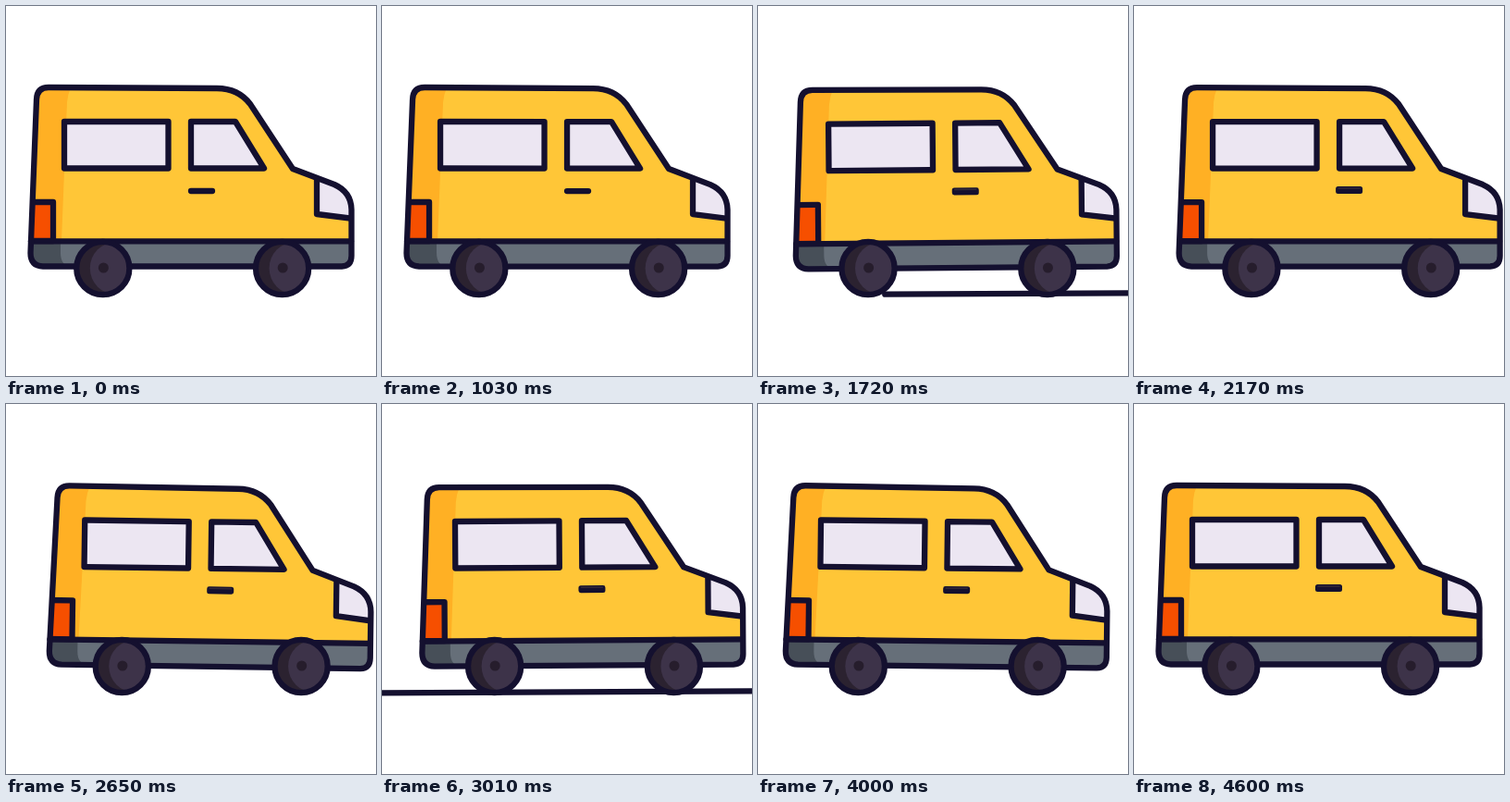
Recreate the animation shown at these times as an HTML page with a canvas. Size 400x400 px, loop 4630 ms.

```html
<!DOCTYPE html>
<html lang="en">
<head>
<meta charset="utf-8">
<title>Van</title>
<style>
  html, body { margin: 0; width: 100%; height: 100%; overflow: hidden; background: #fff; }
  canvas { display: block; width: 400px; height: 400px; }
</style>
</head>
<body>
<canvas id="stage" width="400" height="400"></canvas>
<script>
const ctx = document.getElementById('stage').getContext('2d');

const LOOP = 4630;
const START = 1000;
const PEAK = 2220;
const REACH = 22.2;
const INK = '#14102f';
const GLASS = '#ece6f2';

const BODY = new Path2D(
  'M33 101 Q33.5 88 46 88 L228 89 Q251 89 264 106 L310 176 L355 193 ' +
  'Q373 201 373.5 220 V270 Q373.5 281 363 281.5 H40 Q26.5 281 26.5 267 Z');
const SIDE_WINDOW = new Path2D('M63 125 H175.5 V175.5 H63 Z');
const DOOR_WINDOW = new Path2D('M200 125 H248 L279 175.5 H200 Z');
const TAIL_LIGHT = new Path2D('M20 212 H51 V254 H20 Z');
const HEADLIGHT = new Path2D('M336 180 V225 L380 230.5 V180 Z');
const HANDLE = new Path2D('M200 200 H223');
const SILL = new Path2D('M27 254.3 H373');

// Tilt of the body in degrees; positive is nose down.
const TILT = [[1000, 0], [1300, 0.5], [1850, -0.65], [2560, 0.85],
              [3170, -0.6], [3880, 0.72], [4600, 0]];

const clamp = p => Math.min(1, Math.max(0, p));
const ease = p => (1 - Math.cos(Math.PI * clamp(p))) / 2;

function shift(t) {
  return REACH * (t < PEAK
    ? ease((t - START) / (PEAK - START))
    : 1 - ease((t - PEAK) / (LOOP - PEAK)));
}

function tilt(t) {
  for (let i = 1; i < TILT.length; i++) {
    const [t0, a] = TILT[i - 1], [t1, b] = TILT[i];
    if (t < t1) return a + (b - a) * ease((t - t0) / (t1 - t0));
  }
  return 0;
}

function fill(path, color) {
  ctx.fillStyle = color;
  ctx.fill(path);
}

function stroke(path, width = 6.3, color = INK) {
  ctx.strokeStyle = color;
  ctx.lineWidth = width;
  ctx.stroke(path);
}

function circle(x, y, r) {
  const path = new Path2D();
  path.arc(x, y, r, 0, Math.PI * 2);
  return path;
}

function drawRoad(t) {
  const pass = Math.floor((t - START) / 600);
  if (pass < 0 || pass > 4) return;
  const phase = t - START - pass * 600;
  const edge = delay => {
    const p = clamp((phase - delay) / 196);
    return 440 - 450 * p * p * (3 - 2 * p);
  };
  const head = edge(0), tail = edge(210);
  if (tail - head < 1) return;
  const y = x => 312.4 - x * 0.005;
  const path = new Path2D();
  path.moveTo(head, y(head));
  path.lineTo(tail, y(tail));
  stroke(path);
}

function drawHandle(moving) {
  if (!moving) return stroke(HANDLE);
  const grip = new Path2D();
  grip.roundRect(196, 195, 29, 8, 2.5);
  fill(grip, INK);
  stroke(new Path2D('M199 197 H222'), 1.5, '#342a38');
}

function drawBody(t) {
  const moving = t > 1045;
  const inset = moving ? -2 : 0;
  const angle = tilt(t);
  const pivot = angle < 0 ? 374 : 26;

  ctx.save();
  ctx.translate(pivot, 254);
  ctx.rotate(angle * Math.PI / 180);
  ctx.translate(-pivot, -254);

  ctx.save();
  ctx.clip(BODY);
  fill(BODY, '#ffc637');
  const e = inset;
  fill(new Path2D(`M0 80 H${74 + e} Q${67 + e} 92 ${66 + e} 104 L${60 + e} 254 H0 Z`), '#ffb024');
  ctx.fillStyle = '#666f79';
  ctx.fillRect(0, 254, 400, 40);
  fill(new Path2D(`M0 254 H${59 + e} V267 Q${59 + e} 281 ${71 + e} 282 H0 Z`), '#474f58');
  fill(TAIL_LIGHT, '#f64f00');
  stroke(TAIL_LIGHT);
  fill(HEADLIGHT, GLASS);
  stroke(HEADLIGHT);
  ctx.restore();

  for (const pane of [SIDE_WINDOW, DOOR_WINDOW]) {
    fill(pane, GLASS);
    stroke(pane);
  }
  stroke(SILL);
  stroke(BODY);
  drawHandle(moving);
  ctx.restore();
}

function drawWheel(x) {
  const y = 283.5;
  const tyre = circle(x, y, 28.6);
  fill(tyre, '#2b2230');
  ctx.save();
  ctx.clip(tyre);
  fill(circle(x + 14.5, y, 28.5), '#3d3349');
  ctx.restore();
  fill(circle(x + 0.6, y - 0.5, 5.5), '#261d2c');
  stroke(tyre);
}

function draw(t) {
  ctx.fillStyle = '#fff';
  ctx.fillRect(0, 0, 400, 400);
  ctx.lineCap = ctx.lineJoin = 'round';
  drawRoad(t);
  ctx.save();
  ctx.translate(shift(t), 0);
  drawBody(t);
  drawWheel(104.8);
  drawWheel(298.6);
  ctx.restore();
}

const origin = performance.now();
function tick() {
  draw((performance.now() - origin) % LOOP);
  requestAnimationFrame(tick);
}
tick();
</script>
</body>
</html>
```
